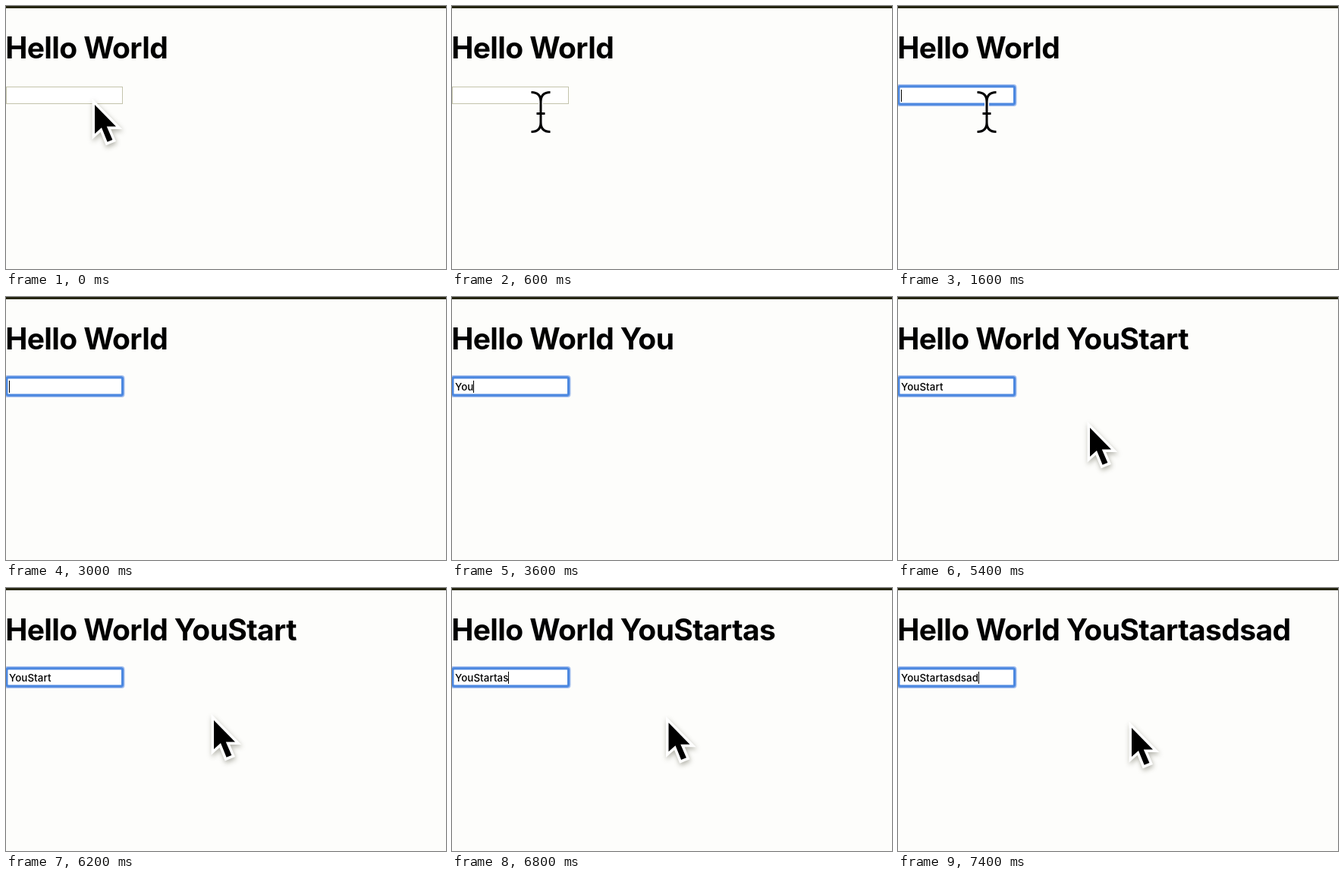
These frames come from a looping animation (580 px wide and 346 px high, 7.6 s). An HTML page with a canvas:

```html
<!DOCTYPE html>
<html lang="en">
<head>
<meta charset="utf-8">
<title>Hello World</title>
<style>
  html, body { margin: 0; width: 100%; height: 100%; overflow: hidden; background: #fdfdfb; }
  canvas { display: block; }
</style>
</head>
<body>
<canvas id="stage" width="580" height="346"></canvas>
<script>
const ctx = document.getElementById('stage').getContext('2d');
const LOOP = 7600, STEP = 200;
const PAPER = '#fdfdfb';

// [start time, typed text]
const typing = [
  [0, ''], [3200, 'Y'], [3400, 'Yo'], [3600, 'You'],
  [4000, 'YouS'], [4200, 'YouSt'], [4400, 'YouSta'], [4600, 'YouStar'], [4800, 'YouStart'],
  [6600, 'YouStarta'], [6800, 'YouStartas'], [7000, 'YouStartasd'],
  [7200, 'YouStartasdsa'], [7400, 'YouStartasdsad']
];
// [start time, caret visible]
const caret = [
  [0, false], [800, true], [1200, false], [1600, true], [2200, false],
  [2600, true], [5200, false], [5600, true], [6200, false], [6600, true]
];
// [time, x, y] of the arrow tip
const path = [
  [5200, 205, 160], [5400, 253, 172], [5600, 262, 176], [5800, 268, 177],
  [6200, 274, 174], [6600, 278, 175], [7400, 308, 184]
];
const arrow = new Path2D('M0 0V38L9 30L16.6 48.8L23.4 46L15.8 28.5H28Z');
const beam = new Path2D('M-12.5 -27.5C-4 -27.5 0 -23 0 -15V12C0 20 -4 24.5 -12.5 24.5' +
  'M12.5 -27.5C4 -27.5 0 -23 0 -15M0 12C0 20 4 24.5 12.5 24.5M-5.5 0.5H5.5');

const at = (list, t) => list.filter(row => row[0] <= t).pop()[1];

function position(t) {
  const i = Math.max(1, path.findIndex(p => p[0] >= t));
  const [t0, x0, y0] = path[i - 1], [t1, x1, y1] = path[i];
  const k = (t - t0) / (t1 - t0);
  return [x0 + (x1 - x0) * k, y0 + (y1 - y0) * k];
}

function text(str, x, y, font, spacing) {
  ctx.font = font;
  ctx.letterSpacing = spacing;
  ctx.fillStyle = '#000';
  ctx.fillText(str, x, y);
}

function drawField(t) {
  if (t < 800) {
    ctx.fillStyle = '#fff';
    ctx.fillRect(0, 106, 154, 23);
    ctx.strokeStyle = '#c4c4ac';
    ctx.lineWidth = 1;
    ctx.strokeRect(0.5, 106.5, 153, 22);
    return;
  }
  const grow = t < 1200 ? 2 : 0;
  const ring = (inset, width, color) => {
    ctx.beginPath();
    ctx.roundRect(inset - grow, 105 + inset - grow, 154.5 - 2 * inset + 2 * grow,
      25 - 2 * inset + 2 * grow, 2);
    ctx.lineWidth = width;
    ctx.strokeStyle = color;
    ctx.stroke();
  };
  ctx.fillStyle = '#fff';
  ctx.fillRect(1, 106, 153, 23);
  ring(0, 4, '#a6c0ee');
  ring(0.9, 3.2, '#4c88e0');
}

function drawArrow(x, y) {
  ctx.save();
  ctx.translate(x, y);
  ctx.lineWidth = 7;
  ctx.lineJoin = 'miter';
  ctx.miterLimit = 3;
  ctx.strokeStyle = '#fff';
  ctx.shadowColor = 'rgba(70, 70, 50, 0.4)';
  ctx.shadowBlur = 6;
  ctx.shadowOffsetX = 1;
  ctx.shadowOffsetY = 3;
  ctx.stroke(arrow);
  ctx.shadowColor = 'transparent';
  ctx.fillStyle = '#000';
  ctx.fill(arrow);
  ctx.restore();
}

function drawBeam(x, y) {
  ctx.save();
  ctx.translate(x, y);
  for (const [width, color] of [[6, '#fff'], [3, '#000']]) {
    ctx.lineWidth = width;
    ctx.strokeStyle = color;
    ctx.stroke(beam);
  }
  ctx.restore();
}

function draw(t) {
  const typed = at(typing, t);
  ctx.fillStyle = PAPER;
  ctx.fillRect(0, 0, 580, 346);
  ctx.fillStyle = '#262612';
  ctx.fillRect(0, 0, 580, 3);

  text('Hello World ' + typed, -0.8, 69, 'bold 39px Inter, sans-serif', '-0.62px');
  drawField(t);
  text(typed, 4, 123, '450 13.33px Inter, sans-serif', '0.08px');
  if (at(caret, t)) {
    ctx.fillRect(4 + Math.round(ctx.measureText(typed).width), 110, 1, 16);
  }

  if (t < 600) drawArrow(117, 130);
  else if (t < 3000) drawBeam(117, 141);
  else if (t >= 5200) drawArrow(...position(t));
}

function tick(now) {
  draw(Math.floor((now % LOOP) / STEP) * STEP);
  requestAnimationFrame(tick);
}
draw(0);
requestAnimationFrame(tick);
</script>
</body>
</html>
```
